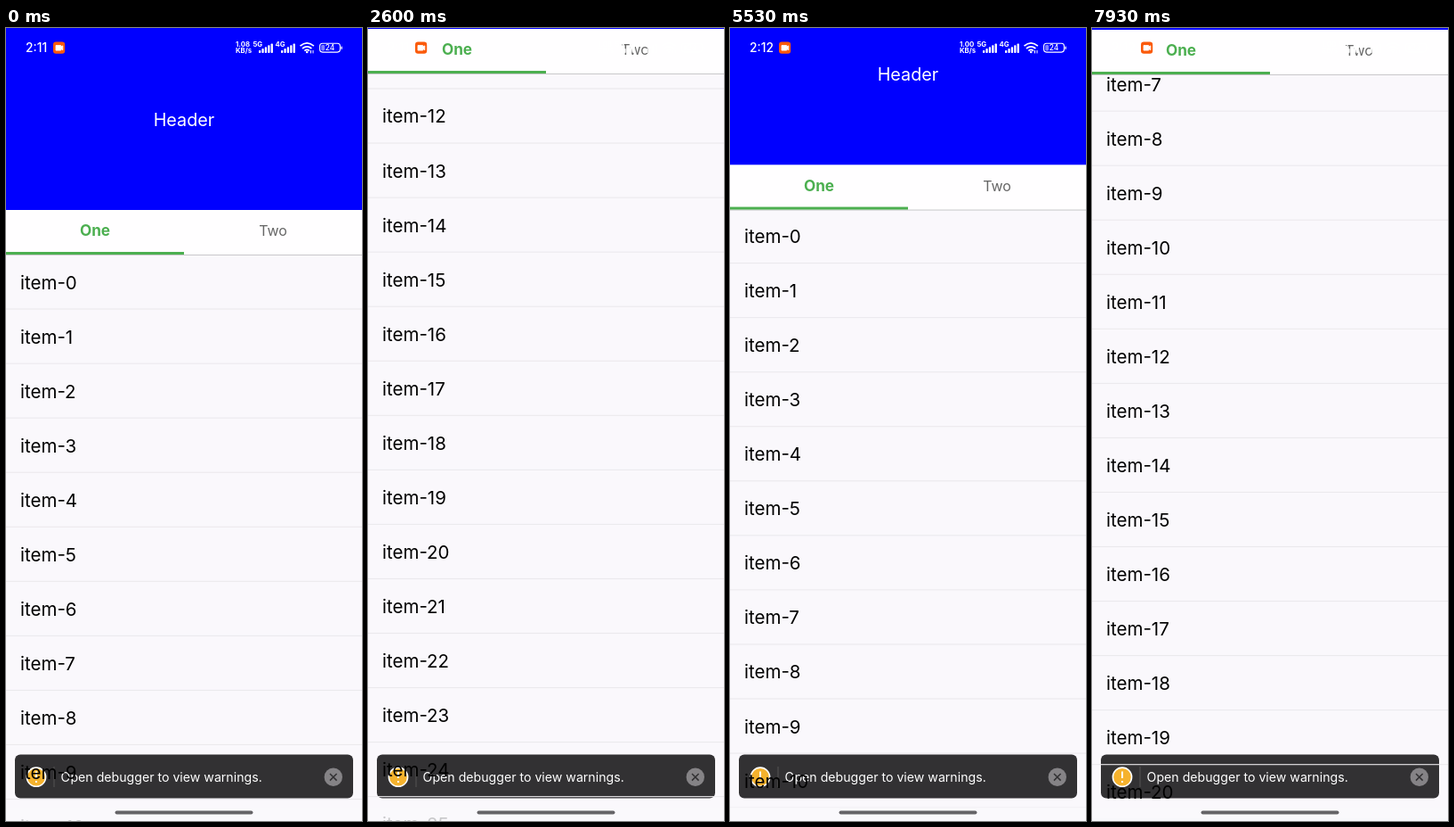
Recreate the animation shown at these times as an HTML page. Size 400 by 889 pixels, loop 8000 ms.

```html
<!DOCTYPE html>
<html lang="en">
<head>
<meta charset="utf-8">
<title>Collapsible tab header</title>
<style>
  html, body { margin: 0; width: 100%; height: 100%; overflow: hidden; background: #faf8fc; }
  svg { display: block; width: 100%; height: 100%; font-family: Inter, Roboto, sans-serif; }
  .row { font-size: 20.5px; fill: #000; font-feature-settings: "case"; }
  .mid { text-anchor: middle; }
  .tiny { font-size: 7.8px; font-weight: 700; }
</style>
</head>
<body>
<svg viewBox="0 0 400 889">
  <rect width="400" height="889" fill="#faf8fc"/>

  <g id="toast">
    <rect x="10" y="814.6" width="380" height="48.9" rx="6" fill="#323133"/>
    <circle cx="34" cy="839.7" r="10.6" fill="#f5b22d" stroke="#fff" stroke-width="1.6"/>
    <path d="M34 833.5v7.5M34 844v2" stroke="#fff" stroke-width="2"/>
    <path d="M54 828v23" stroke="#555"/>
    <text x="61.6" y="845" font-size="14.15" fill="#fff">Open debugger to view warnings.</text>
    <circle cx="367.8" cy="839.7" r="10.2" fill="#858386"/>
    <path d="M364 836l7.6 7.6m0-7.6l-7.6 7.6" stroke="#323133" stroke-width="1.5"/>
  </g>

  <g id="rows"></g>

  <g id="top">
    <rect y="-4" width="400" height="208" fill="#00f"/>
    <text class="mid" x="200" y="109.5" font-size="19.8" fill="#fff">Header</text>
    <rect y="204" width="400" height="50" fill="#fffeff"/>
    <rect y="254" width="400" height="1" fill="#c9c8ca"/>
    <rect y="251" width="200" height="3" fill="#4caf50"/>
    <text class="mid" x="100" y="233" font-size="17.2" font-weight="700" fill="#4caf50">One</text>
    <text class="mid" x="300" y="233" font-size="16" fill="#666">Two</text>
  </g>

  <g id="status" fill="#fff">
    <text id="clock" x="22" y="27.3" font-size="13.8" font-weight="500">2:11</text>
    <g id="recorder">
      <rect x="53" y="15.5" width="13.2" height="13.2" rx="3.2" fill="#fb5a0b"/>
      <path d="M56 19.5h5.6v1.6l2.2-1.2v4.8l-2.2-1.2v1.6h-5.6z" stroke="#fff" stroke-width=".8" stroke-linejoin="round"/>
    </g>
    <text id="speed" class="tiny" x="258" y="21.2">1.08</text>
    <text class="tiny" x="258" y="28.2">KB/s</text>
    <text class="tiny" x="277.5" y="21.2">5G</text>
    <text class="tiny" x="302.5" y="21.2">4G</text>
    <g id="bars"></g>
    <g fill="none" stroke="#fff" stroke-width="1.7">
      <path d="M330.5 20.2q7.7-6.6 15.4 0M333 23q5.2-4.4 10.4 0M335.4 25.6q2.8-2.4 5.6 0"/>
      <rect x="352.6" y="17.3" width="22.8" height="9.8" rx="3" stroke-width="1.1"/>
    </g>
    <circle cx="338.2" cy="27" r="1.3"/>
    <path d="M342.5 25v3.4M345 25v3.4" stroke="#fff"/>
    <rect x="354.2" y="18.9" width="4" height="6.6" rx="1.4" opacity=".5"/>
    <rect x="376.4" y="20.4" width="1.4" height="3.6" rx=".7"/>
    <text class="mid" x="364" y="25.4" font-size="8.4" font-weight="500">24</text>
  </g>

  <rect y="874" width="400" height="15" fill="#fbfafd" opacity=".8"/>
  <rect x="122.5" y="877.6" width="155" height="4" rx="2" fill="#656467"/>
</svg>

<script>
const LOOP = 8000, STEP = 1000 / 15, PITCH = 61.05, COLLAPSE = 203;
const CLOCK_TICK = 5300, SPEED_TICK = 3000;

// [time in ms, scroll distance in px]
const SCROLL = [
  [0, 0], [400, 14], [870, 78], [1333, 210], [1900, 490], [2600, 918.6],
  [2900, 955], [3200, 895], [3800, 541], [4400, 200], [4667, 70], [4870, 0],
  [5200, 0], [5600, 65], [6133, 185.3], [6600, 395], [7100, 588], [7600, 643], [7933, 649.3]
];

const $ = id => document.getElementById(id);
const slope = i => (SCROLL[i + 1][1] - SCROLL[i][1]) / (SCROLL[i + 1][0] - SCROLL[i][0]);

// Harmonic mean of neighbouring slopes keeps the curve from overshooting.
const tangents = SCROLL.map((_, i) => {
  if (i === 0 || i === SCROLL.length - 1) return 0;
  const a = slope(i - 1), b = slope(i);
  return a * b > 0 ? 2 * a * b / (a + b) : 0;
});

function scrollAt(time) {
  const last = SCROLL.length - 1;
  if (time >= SCROLL[last][0]) return SCROLL[last][1];
  const i = SCROLL.findIndex(key => key[0] > time) - 1;
  const [t0, y0] = SCROLL[i], [t1, y1] = SCROLL[i + 1];
  const d = t1 - t0, u = (time - t0) / d, v = 1 - u;
  return v * v * (1 + 2 * u) * y0 + u * u * (3 - 2 * u) * y1
       + d * u * v * (v * tangents[i] - u * tangents[i + 1]);
}

$('rows').innerHTML = Array.from({ length: 32 }, (_, i) => `
  <text class="row" x="16" y="${292.5 + i * PITCH}">item-${i}</text>
  <rect y="${314.5 + i * PITCH}" width="400" height="1.1" fill="#ebe9ed"/>`).join('');

$('bars').innerHTML = [284, 309].map(x => Array.from({ length: 5 }, (_, i) => {
  const h = 3 + i * 1.9;
  return `<rect x="${x + i * 3.4}" y="${28 - h}" width="2.3" height="${h}" rx=".8"/>`;
}).join('')).join('');

const shift = (id, x, y) => $(id).setAttribute('transform', `translate(${x} ${y})`);

function draw(now) {
  const time = Math.floor((now % LOOP + 4) / STEP) * STEP;
  const late = time >= CLOCK_TICK;
  const y = scrollAt(time);
  const collapsed = Math.max(0, Math.min(y, COLLAPSE) - (late ? 1 : 0));
  shift('rows', 0, -y);
  shift('top', 0, -collapsed);
  shift('recorder', late ? 2 : 0, 0);
  $('clock').textContent = late ? '2:12' : '2:11';
  $('speed').textContent = time < SPEED_TICK ? '1.08' : '1.00';
}

const start = performance.now();
function tick() {
  draw(performance.now() - start);
  requestAnimationFrame(tick);
}
tick();
</script>
</body>
</html>
```
